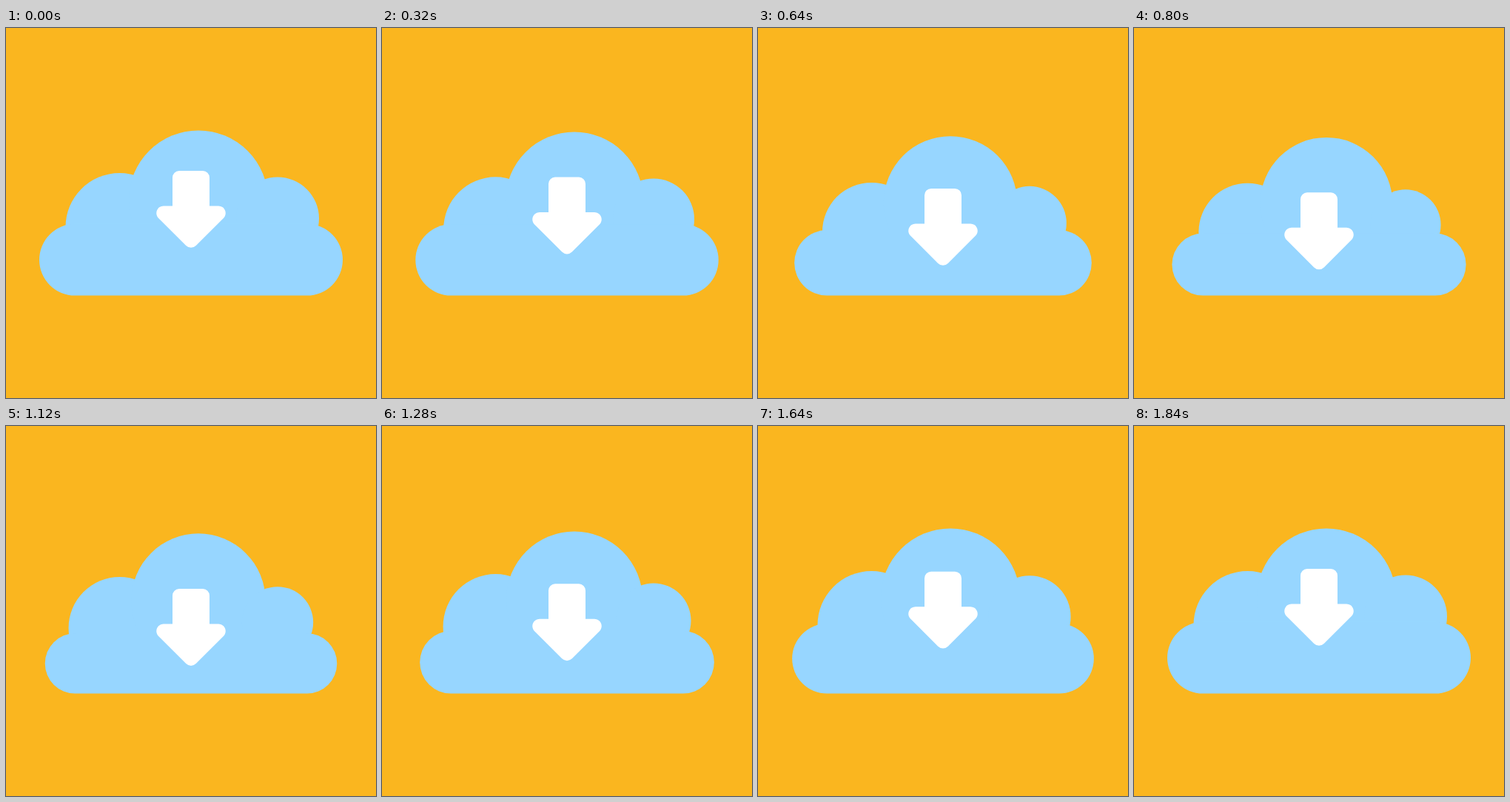
These frames come from a looping animation (500x500 px, 1.92 s). An HTML page with a canvas:

```html
<!DOCTYPE html>
<html lang="en">
<head>
<meta charset="utf-8">
<title>Cloud download</title>
<style>
  html, body { margin: 0; width: 100%; height: 100%; overflow: hidden; background: #fab61f; }
  canvas { display: block; width: 100vw; height: 100vh; object-fit: contain; }
</style>
</head>
<body>
<canvas id="stage" width="500" height="500"></canvas>
<script>
const ctx = document.getElementById('stage').getContext('2d');
const LOOP = 1920, STEP = 40, END = 1840;
const BG = '#fab61f', SKY = '#97d6ff', WHITE = '#fff';

// Each puff shrinks towards its lowest point and grows back.
const puffs = [
  { x: 153.5, bottom: 342, r: 73, shrink: 6.9, start: 0, peak: 760, end: 1570 },
  { x: 260, bottom: 326.6, r: 94.1, shrink: 4.8, start: 100, peak: 850, end: 1630 },
  { x: 367, bottom: 313.5, r: 56, shrink: 9.1, start: 165, peak: 930, end: 1740 }
];
const base = { left: 93.4, right: 406.6, bottom: 361.6, r: 48.4, shrink: 8, start: 230, peak: 1030, end: 1830 };
const arrow = { travel: 30.8, start: 0, peak: 920, end: 1840 };

function ease(s) {
  s = Math.min(1, Math.max(0, s));
  return s * s * (3 - 2 * s);
}

// 0 at start, 1 at peak, 0 again at end.
function pulse(m, t) {
  return t < m.peak
    ? ease((t - m.start) / (m.peak - m.start))
    : ease((m.end - t) / (m.end - m.peak));
}

const radius = (m, t) => m.r - m.shrink * pulse(m, t);

function drawCloud(t) {
  ctx.fillStyle = SKY;
  for (const p of puffs) {
    const r = radius(p, t);
    ctx.beginPath();
    ctx.arc(p.x, p.bottom - r, r, 0, Math.PI * 2);
    ctx.fill();
  }
  const r = radius(base, t), y = base.bottom - r;
  ctx.beginPath();
  ctx.arc(base.left, y, r, Math.PI / 2, Math.PI * 1.5);
  ctx.arc(base.right, y, r, -Math.PI / 2, Math.PI / 2);
  ctx.closePath();
  ctx.fill();
}

function drawArrow(t) {
  ctx.save();
  ctx.translate(250, 193 + arrow.travel * pulse(arrow, t));
  ctx.fillStyle = WHITE;
  ctx.beginPath();
  ctx.moveTo(0, 0);
  ctx.arcTo(25, 0, 25, 47.5, 9);
  ctx.lineTo(25, 47.5);
  ctx.arcTo(60.3, 47.5, 0, 107.8, 9.6);
  ctx.arcTo(0, 107.8, -60.3, 47.5, 9.6);
  ctx.arcTo(-60.3, 47.5, -25, 47.5, 9.6);
  ctx.lineTo(-25, 47.5);
  ctx.arcTo(-25, 0, 0, 0, 9);
  ctx.closePath();
  ctx.fill();
  ctx.restore();
}

function draw(ms) {
  const t = Math.min(END, Math.floor((ms % LOOP) / STEP) * STEP);
  ctx.fillStyle = BG;
  ctx.fillRect(0, 0, 500, 500);
  drawCloud(t);
  drawArrow(t);
}

const t0 = performance.now();
function tick() {
  draw(performance.now() - t0);
  requestAnimationFrame(tick);
}
tick();
</script>
</body>
</html>
```
